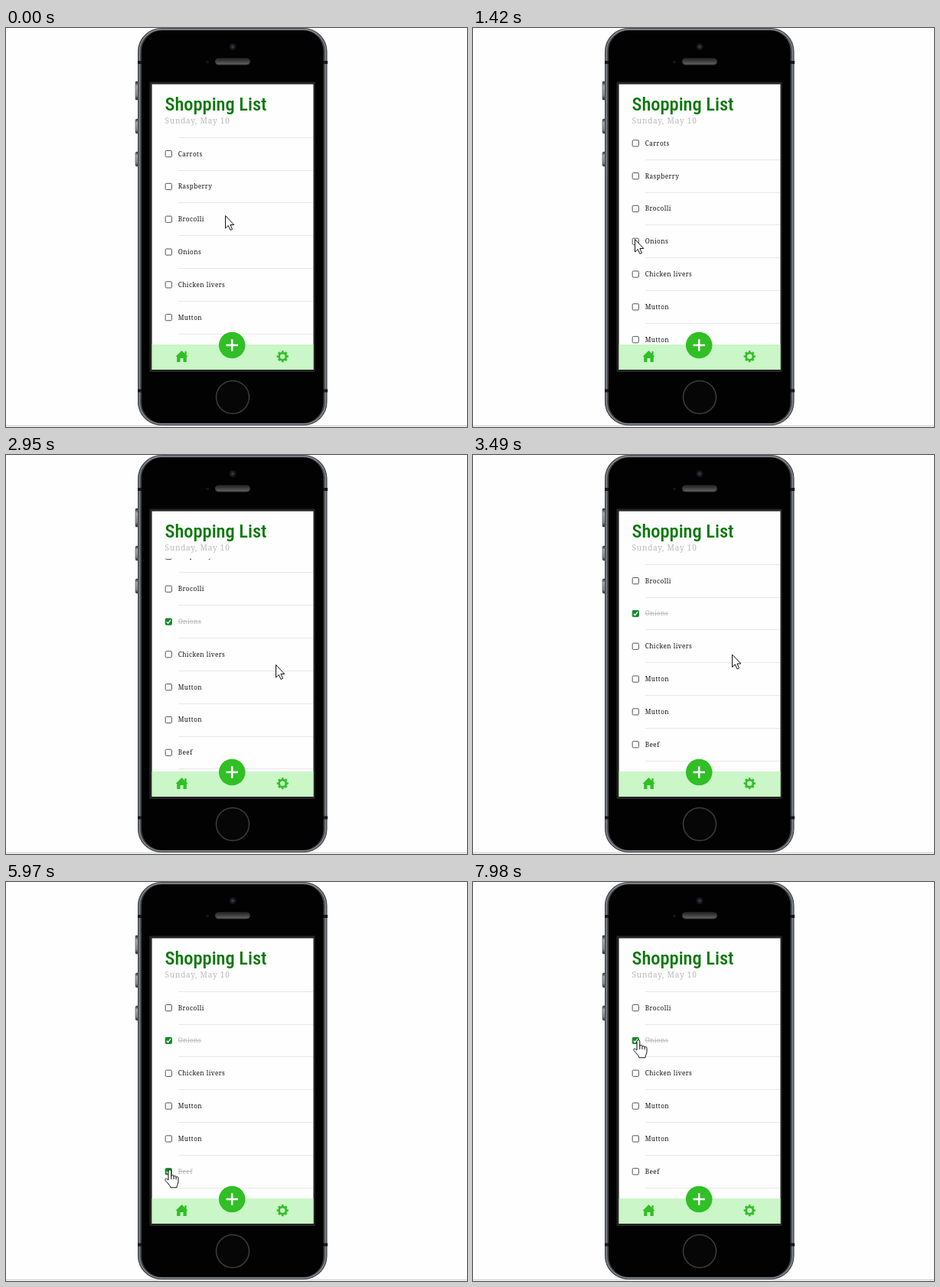
These frames come from a looping animation (602x522 px, 8 s). An HTML page:

```html
<!DOCTYPE html>
<html lang="en">
<head>
<meta charset="utf-8">
<title>Shopping List</title>
<style>
  html, body { margin: 0; width: 100%; height: 100%; overflow: hidden; background: #fefefe; }
  svg { display: block; }
  #title { font: 500 26px 'Roboto Condensed', Roboto, sans-serif; font-stretch: 75%; fill: #087808; }
  #date { font: 10px 'Noto Serif', serif; letter-spacing: .8px; fill: #b9b9b9; }
  .line { stroke: #e8e8e8; shape-rendering: crispEdges; }
  .row text { font: 500 8.2px 'Noto Serif', serif; letter-spacing: .46px; fill: #111; }
  .row rect { fill: #fff; stroke: #555; }
  .tick { fill: none; stroke-width: 1.4; }
  .done text { fill: #b4b4b4; text-decoration: line-through; }
  .done rect { fill: #12892a; stroke: #12892a; }
  .done .tick { stroke: #fff; }
</style>
</head>
<body>
<svg width="602" height="522" viewBox="0 0 602 522">
  <defs>
    <linearGradient id="button" x2="0" y2="1">
      <stop offset="0" stop-color="#222"/>
      <stop offset=".25" stop-color="#a9adb2"/>
      <stop offset=".75" stop-color="#85898e"/>
      <stop offset="1" stop-color="#222"/>
    </linearGradient>
    <linearGradient id="grille" x2="0" y2="1">
      <stop offset="0" stop-color="#222"/>
      <stop offset="1" stop-color="#666"/>
    </linearGradient>
    <clipPath id="view"><rect x="191" y="135.5" width="210" height="311"/></clipPath>
  </defs>

  <path d="M0 520.5H602" stroke="#d4d4d4" stroke-width="1.5"/>

  <!-- phone -->
  <g fill="url(#button)" stroke="#55585c" stroke-width=".6">
    <rect x="169" y="70" width="5" height="24" rx="1"/>
    <rect x="169" y="119" width="5" height="19" rx="2"/>
    <rect x="169" y="162" width="5" height="19" rx="2"/>
  </g>
  <rect x="172.5" y=".5" width="246.5" height="519" rx="30" fill="#43464b" stroke="#4b4e53"/>
  <rect x="174.3" y="2" width="243" height="516" rx="28.5" fill="none" stroke="#8c9197" stroke-width="1.3"/>
  <path d="M172 45H420M172 474.5H420" stroke="#17181a" stroke-width="4"/>
  <rect x="177" y="3" width="237.5" height="514" rx="27" fill="#020202"/>
  <circle cx="296" cy="24.5" r="4.5" fill="#17171c"/>
  <circle cx="296" cy="24.5" r="2" fill="#34344e"/>
  <circle cx="263" cy="44.5" r="2" fill="#151515"/>
  <circle cx="277" cy="44" r="4" fill="#222"/>
  <rect x="273.5" y="40" width="45" height="8" rx="4" fill="url(#grille)" stroke="#333"/>
  <circle cx="296" cy="483" r="21.5" fill="#060606" stroke="#3d3d3d" stroke-width="1.5"/>
  <rect x="187.5" y="70.5" width="216" height="379.5" rx="1" fill="#252525"/>
  <rect x="190.6" y="73.6" width="210.8" height="373.4" fill="#fefefe"/>

  <!-- app -->
  <text id="title" x="207.5" y="108">Shopping List</text>
  <text id="date" x="207.5" y="125">Sunday, May 10</text>
  <g clip-path="url(#view)"><g id="list"></g></g>
  <rect x="190.6" y="414" width="210.8" height="33" fill="#cbf6c8"/>
  <g fill="#30bf25">
    <circle cx="295.2" cy="415" r="17.3"/>
    <path d="M229.5 422 237.5 430H235.8V437H231.5V432H227.5V437H223.2V430H221.5ZM233.4 423H235.6V428L233.4 426Z"/>
  </g>
  <path d="M287.5 415H303M295.2 407.3V422.8" stroke="#fff" stroke-width="2.6"/>
  <g fill="none" stroke="#30bf25">
    <circle cx="361.2" cy="429.7" r="4.6" stroke-width="2.8"/>
    <circle cx="361.2" cy="429.7" r="6.5" stroke-width="2.2" pathLength="16" stroke-dasharray="1" stroke-dashoffset=".5"/>
  </g>

  <!-- pointer, with the tip at its origin -->
  <g id="pointer" fill="#fff" stroke="#111" stroke-linejoin="round">
    <path id="arrow" d="M.5.5V17L4.3 13.5 7 19.5 9.5 18.3 6.9 12.5H11.8Z"/>
    <g id="hand" transform="translate(-7 0)">
      <path d="M5 14V2.4a1.9 1.9 0 0 1 3.8 0V9a1.6 1.6 0 0 1 3.2 0v.6a1.6 1.6 0 0 1 3.1.4v.6a1.5 1.5 0 0 1 2.9.6V16c0 3-2 4.5-2 7.8H8C7.4 20.5 3.2 17.5 1 14.3c-1-1.8 1-3.2 2.4-1.5Z"/>
      <path d="M8.8 9V13M12 9.6V13M15.1 10.6V13.5" fill="none"/>
    </g>
  </g>
</svg>
<script>
const LOOP = 8000, START = 290, STEP = 138.6;   // the screen refreshes once per STEP
const TOP = 164.5, PITCH = 42.82;               // centre of the first row, row spacing
const items = ['Carrots', 'Raspberry', 'Brocolli', 'Onions', 'Chicken livers', 'Mutton', 'Mutton', 'Beef'];
const $ = id => document.getElementById(id);

// Pointer stops: [step, x, y]
const stops = [[3, 286, 245], [5, 211, 276], [8, 211, 276], [10, 213, 276], [13, 346, 339],
  [15, 351, 323], [19, 352, 274], [22, 350, 252], [24, 326, 269], [26, 259, 353], [29, 224, 375],
  [33, 214, 376], [49, 214, 376], [50, 213, 359], [52, 212, 247], [53, 215, 219], [55, 216, 206]];

const progress = (k, from, to) => Math.min(1, Math.max(0, (k - from) / (to - from)));
const easeOut = p => Math.sin(p * Math.PI / 2);
const easeInOut = p => (1 - Math.cos(p * Math.PI)) / 2;

const scrollAt = k => -13.8 * easeOut(progress(k, -1, 3)) - 71.8 * easeInOut(progress(k, 13.2, 20.94));

function pointerAt(k) {
  const i = Math.max(1, stops.findIndex(s => s[0] >= k));
  const [k0, x0, y0] = stops[i - 1], [k1, x1, y1] = stops[i];
  const p = progress(k, k0, k1);
  return [x0 + (x1 - x0) * p, y0 + (y1 - y0) * p];
}

$('list').innerHTML = items.map((name, i) => `
  <g class="row" transform="translate(0 ${i * PITCH})">
    <path class="line" d="M225 143.3H400.5"/>
    <rect x="208.2" y="160.5" width="8.2" height="8.2" rx="1.2"/>
    <path class="tick" d="M209.8 164.8 211.6 166.7 215 162.4"/>
    <text x="224.7" y="167.5">${name}</text>
  </g>`).join('') + `<path class="line" d="M225 ${143.3 + items.length * PITCH}H400.5"/>`;
const rows = document.querySelectorAll('.row');

// Size the heading evenly to its column
$('title').style.fontSize = Math.min(30, 26 * 133 / $('title').getComputedTextLength()) + 'px';

function draw(now) {
  const k = Math.floor((now % LOOP - START) / STEP);
  const scroll = scrollAt(k), [x, y] = pointerAt(k);
  const overRow = x >= 212 && x < 250 && items.some((_, i) => Math.abs(TOP + i * PITCH + scroll - y) < 10);
  $('list').setAttribute('transform', `translate(0 ${scroll})`);
  $('pointer').setAttribute('transform', `translate(${x} ${y})`);
  $('arrow').style.display = overRow ? 'none' : '';
  $('hand').style.display = overRow ? '' : 'none';
  rows[3].classList.toggle('done', k >= 9);
  rows[7].classList.toggle('done', k >= 34 && k < 44);
  requestAnimationFrame(draw);
}
draw(performance.now());
</script>
</body>
</html>
```
